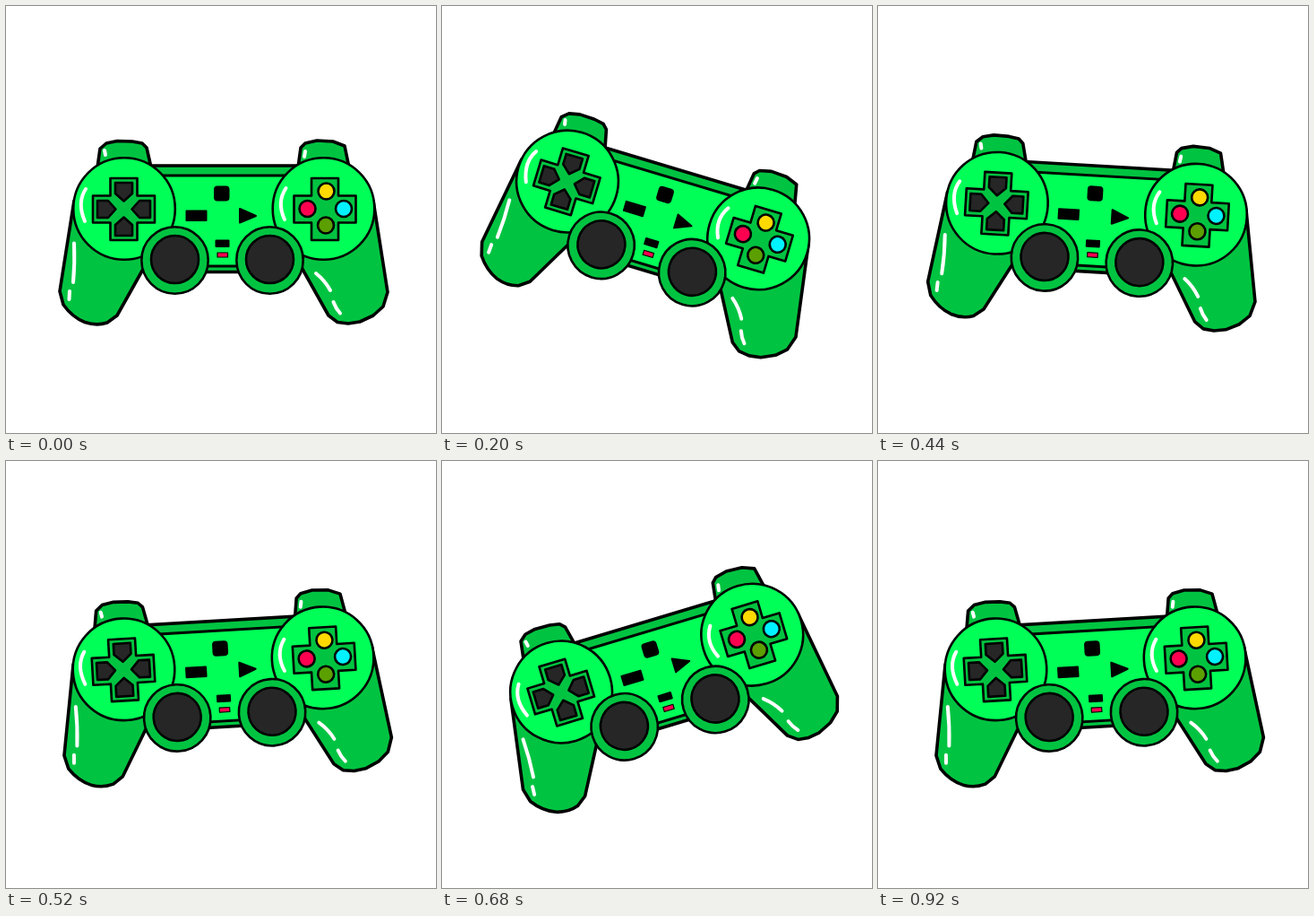
Animation of 480x476 px, one loop 960 ms. Source, as an HTML page:

```html
<!DOCTYPE html>
<html lang="en">
<head>
<meta charset="utf-8">
<title>Rocking gamepad</title>
<style>
  html, body { margin: 0; height: 100%; overflow: hidden; background: #fff; }
  svg { display: block; width: 100%; height: 100%; }
  #pad { stroke: #000; stroke-width: 2.6; stroke-linejoin: round; }
  .dark { fill: #00c441; }
  .light { fill: #00ff57; }
  .grey { fill: #262626; }
  .bold { stroke-width: 3.6; }
  .shine { fill: none; stroke: #fff; stroke-width: 4; stroke-linecap: round; }
</style>
</head>
<body>
<svg viewBox="0 0 480 476">
  <defs>
    <path id="cross" class="dark" d="M-15-34.5H15V-15H34.5V15H15V34.5H-15V15H-34.5V-15H-15Z"/>
    <path id="key" class="grey" d="M-9.5-29.5H9.5V-17.5L0-9L-9.5-17.5Z"/>
    <g id="stick">
      <circle class="dark" r="37.2"/>
      <circle class="grey" cy="-1" r="26.5"/>
    </g>
  </defs>
  <g id="pad">
    <g class="dark bold">
      <path d="M102 180L105 159L112 153L124 150.500L141 151L152 153L157 158L162 180Z"/>
      <path d="M326 180L329 158L334 153L347 150L365 151L378 156L383 180Z"/>
      <path d="M76 217L60 318L64 333Q74 347 88 352.500Q101 357 113 353L124 345L156 288L132 226Z"/>
      <path d="M410 217L426 319L421 335L410 345L395 352L382 354L370 352.500L360 345L328 288L354 226Z"/>
      <rect x="160" y="178" width="168" height="118.500"/>
    </g>
    <rect class="light" x="160" y="189" width="168" height="101" stroke-width="3"/>
    <g class="light">
      <circle cx="132" cy="226" r="56.800"/>
      <circle cx="354.500" cy="226" r="56.800"/>
    </g>
    <use href="#stick" x="188.500" y="283.500"/>
    <use href="#stick" x="294.500" y="283.500"/>

    <g transform="translate(131.500 226.500)">
      <use href="#cross"/>
      <use href="#key"/>
      <use href="#key" transform="rotate(90)"/>
      <use href="#key" transform="rotate(180)"/>
      <use href="#key" transform="rotate(270)"/>
    </g>
    <use href="#cross" x="356" y="226.500"/>
    <circle cx="357.500" cy="206.500" r="9" fill="#ffd900"/>
    <circle cx="336.500" cy="226" r="9" fill="#ff0051"/>
    <circle cx="377" cy="226" r="9" fill="#00f2ff"/>
    <circle cx="357" cy="244.500" r="9" fill="#5b9f00"/>

    <g stroke-width="2">
      <rect x="233" y="201.500" width="15.500" height="15" rx="3"/>
      <rect x="201.500" y="228.500" width="22" height="10.500"/>
      <path d="M261 226L279 234L261 241.500Z"/>
      <rect x="234.500" y="261.500" width="14" height="6.500"/>
      <rect x="236" y="275" width="11.500" height="5" fill="#ff0051" stroke-width="1.200"/>
    </g>

    <g class="shine">
      <path d="M89 204Q79 219 88 240M312.500 203Q302 219 311 238"/>
      <path d="M76 264.500Q77 287 75 308M71 318L70.500 327"/>
      <path d="M346 298Q356 306 362 317M365.500 330Q368 337 373 342.500"/>
      <path d="M110 161L111 166M334 162L333 168"/>
    </g>
  </g>
</svg>
<script>
  const pad = document.getElementById('pad');
  const STEP_MS = 40, STEPS = 24, SWING = 20;

  // Triangle wave: 0 -> +1 -> -1 -> 0 over one loop.
  const triangle = p => 1 - 4 * Math.abs((p + 0.25) % 1 - 0.5);

  function draw(now) {
    const step = Math.floor(now / STEP_MS) % STEPS;
    pad.setAttribute('transform', `rotate(${SWING * triangle(step / STEPS)} 240 238)`);
    requestAnimationFrame(draw);
  }
  draw(performance.now());
</script>
</body>
</html>
```
